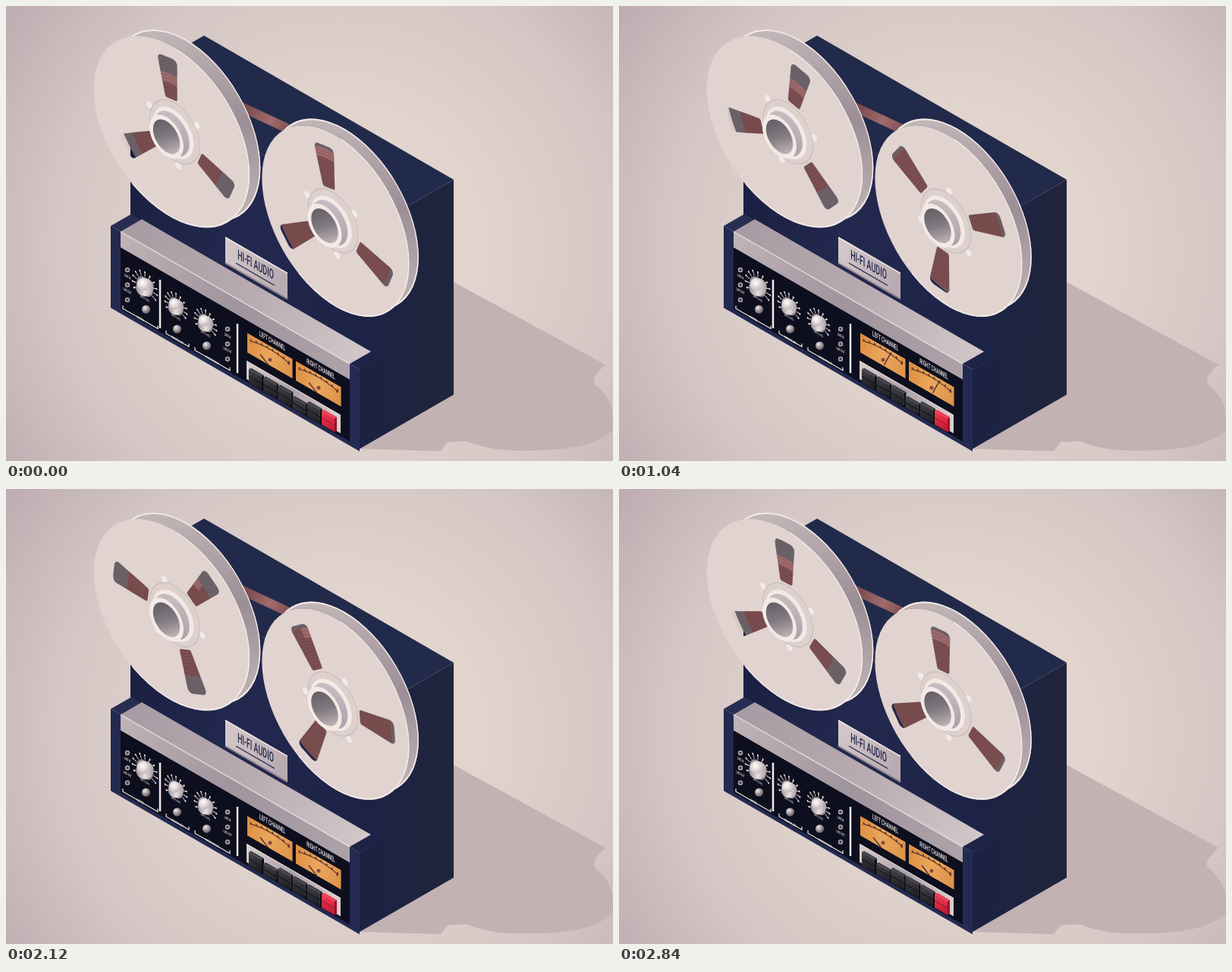
Recreate the animation shown at these times as an HTML page with a canvas. Size 800 by 600 pixels, loop 2880 ms.

```html
<!DOCTYPE html>
<html lang="en">
<head>
<meta charset="utf-8">
<title>Tape recorder</title>
<style>
  html, body { margin: 0; width: 100%; height: 100%; overflow: hidden; background: #dccfcb; }
  canvas { display: block; }
</style>
</head>
<body>
<canvas id="stage" width="800" height="600"></canvas>
<script>
const c = document.getElementById('stage').getContext('2d');
const LOOP = 2880, STEP = 40, REWIND_AT = 1920;
const SLOPE = Math.tan(Math.PI / 6), WIDTH = Math.cos(Math.PI / 6);
const RAD = Math.PI / 180;
const WHITE = '#f3eae6', NAVY = '#22264c';

function gradient(g, colors) {
  colors.forEach((color, i) => g.addColorStop(i / (colors.length - 1), color));
  return g;
}
const linear = (x1, y1, x2, y2, ...colors) => gradient(c.createLinearGradient(x1, y1, x2, y2), colors);
const radial = (x, y, r, ...colors) => gradient(c.createRadialGradient(x, y, 0, x, y, r), colors);

function line(color, width, ...points) {
  c.strokeStyle = color;
  c.lineWidth = width;
  c.beginPath();
  for (let i = 0; i < points.length; i += 2) c.lineTo(points[i], points[i + 1]);
  c.stroke();
}
function disc(fill, x, y, r) {
  c.fillStyle = fill;
  c.beginPath();
  c.arc(x, y, r, 0, 7);
  c.fill();
}
function ring(color, width, x, y, r, from = 0, to = 7) {
  c.strokeStyle = color;
  c.lineWidth = width;
  c.beginPath();
  c.arc(x, y, r, from, to);
  c.stroke();
}

// Isometric rectangles, each placed by its front left corner on screen.
function slab(fill, x, y, ax, ay, bx, by) {
  c.fillStyle = fill;
  c.beginPath();
  c.moveTo(x, y);
  c.lineTo(x + ax, y + ay);
  c.lineTo(x + ax + bx, y + ay + by);
  c.lineTo(x + bx, y + by);
  c.fill();
}
const front = (fill, x, y, w, h) => slab(fill, x, y, w, w * SLOPE, 0, h);
const top3d = (fill, x, y, w, d) => slab(fill, x, y, w, w * SLOPE, d, -d * SLOPE);
const side = (fill, x, y, d, h) => slab(fill, x, y, d, -d * SLOPE, 0, h);
const edge = (color, width, x, y, w) => line(color, width, x, y, x + w, y + w * SLOPE);
const across = (x, y, w, ...colors) => linear(x, y, x + w, y + w * SLOPE, ...colors);

// Draws in the front plane with its origin at (x, y).
function onFace(x, y, draw, width = WIDTH) {
  c.save();
  c.transform(width, .5, 0, 1, x, y);
  draw();
  c.restore();
}
function label(text, x, y, size, color = WHITE) {
  onFace(x, y, () => {
    c.scale(.59, 1);
    c.font = `500 ${size}px Roboto, sans-serif`;
    c.textAlign = 'center';
    c.textBaseline = 'middle';
    c.fillStyle = color;
    c.fillText(text, 0, 0);
  });
}

function drawBackground() {
  c.fillStyle = radial(440, 320, 570, '#e4d8cf', '#e1d4cd', '#d4c6c4', '#b9a8ae');
  c.fillRect(0, 0, 800, 600);
  c.fillStyle = '#c3b2b4';
  c.fill(new Path2D('M590 364 790 473Q769 492 777 500Q800 518 800 545V560Q770 587 690 586Q640 588 608 574L582 575 573 587 466 584Z'));
}

function drawCabinet() {
  top3d('#222a4b', 164, 95, 329, 97);
  side(linear(493, 0, 590, 0, '#1d2343', '#20253c'), 493, 285, 97, 228);
  front(across(164, 180, 329, '#191e3f', '#23284f', '#1d2346'), 164, 95, 329, 190);

  side(linear(466, 0, 590, 0, '#1c2243', '#20253c'), 466, 479, 124, 105);
  top3d(across(138, 290, 328, '#282d52', '#1d2346'), 138, 290, 328, 27);
  front(across(138, 290, 328, '#23294f', '#232b52'), 138, 290, 328, 108);

  top3d(across(151, 290, 330, '#a79ba3', '#b7abb0', '#d4cacb'), 151, 297.5, 302, 28);
  front(across(151, 300, 302, '#c0b4b8', '#a0949d', '#aea2a9'), 151, 297.5, 302, 21);
  edge('#e9dfdc', 1.4, 151, 297.5, 302);
  front('#0e0f1e', 151, 318.5, 302, 81.5);

  front(across(289, 305, 82, '#d6cac9', '#b8acb2'), 289, 305, 82, 34);
  edge(WHITE, 1.5, 289, 305, 82);
  edge('#8e838e', 2, 289, 339, 82);
  label('HI-FI AUDIO', 329, 342, 17.5, NAVY);
  edge(NAVY, 1.3, 303, 339, 51);
}

function drawSockets(x, y) {
  for (let i = 0; i < 3; i++) {
    disc('#b9adb0', x, y + i * 19.7, 3.2);
    disc('#4a4450', x, y + i * 19.7, 1.8);
  }
  label('LINE IN', x, y + 9, 5);
  label('LINE OUT', x, y + 28, 5);
}

function drawKnob(x, y, r) {
  onFace(x, y, () => {
    for (let degrees = 150; degrees <= 390; degrees += 24) {
      const co = Math.cos(degrees * RAD) * r, si = Math.sin(degrees * RAD) * r;
      line(WHITE, 1, co, si, co * 1.4, si * 1.4);
      disc(WHITE, co * 1.45, si * 1.45, 1.2);
    }
    disc('#8f858c', 0, 0, r * .95);
  });
  disc(linear(x - r, y, x + r, y, '#8e858b', '#e9e0df', '#9d9399'), x, y + 1, r * .9);
  disc(radial(x - 3, y - 5, r, '#ffffff', '#ddd3d3', '#b0a5aa'), x - 2, y - 3, r * .65);
  label('INPUT LEVEL', x, y + r + 3, 4);
  disc(radial(x, y + 28, 8, WHITE, '#a59ba0', '#655c66'), x + 1.5, y + 30, 5.5);
}

function drawBracket(x, y, w, text) {
  const endY = y + w * SLOPE;
  line(WHITE, 1.2, x, y - 4, x, y, x + w, endY, x + w, endY - 4);
  label(text, x + w / 2, (y + endY) / 2, 4.5);
}

function drawControls() {
  drawSockets(160, 348);
  drawSockets(292, 426);
  drawKnob(183, 370, 13);
  drawKnob(224, 396, 11.5);
  drawKnob(263, 418, 11.5);
  line(WHITE, 2.5, 203, 361, 203, 425);
  line(WHITE, 2.5, 305, 419, 305, 484);
  drawBracket(154, 399, 46, 'MASTER');
  drawBracket(211, 432, 30, 'MONITOR LEFT');
  drawBracket(249, 454, 46, 'MONITOR RIGHT');
}

function drawMeter(x, y, name, angle) {
  const ink = '#4b2c2a';
  label(name, x + 33, y + 11, 9.5);
  onFace(x, y, () => {
    c.beginPath();
    c.rect(0, 0, 69, 26);
    c.clip();
    c.fillStyle = linear(0, 0, 69, 20, '#dc8c3f', '#eba75c', '#dc9148');
    c.fill();
    const arcY = u => 4.5 + ((u - 34.5) / 15) ** 2;
    for (let u = 4; u < 64; u += 2) line(ink, 1.3, u, arcY(u), u + 2, arcY(u + 2));
    for (let u = 5; u < 64; u += 8.3) line(ink, 1.8, u, arcY(u) - 2.5, u + 1, arcY(u));
    disc('#70333c', 63, 9, 1.6);
  });
  // The needle turns about a point hidden below the window.
  c.save();
  c.beginPath();
  c.rect(x, y, 60, 59);
  c.clip();
  disc('#814a4b', x + 30, y + 35.5, 2.5);
  c.translate(x + 30, y + 45);
  c.rotate(angle);
  line('#4a3136', 1.4, 0, -3, 0, -21);
  c.restore();
}

function drawKey(x, y, pressed, [light, body, dark]) {
  const drop = pressed * 4, h = 18 - drop;
  y += drop;
  front(linear(x, y, x, y + 28, light, body), x, y, 17, h);
  top3d(light, x, y, 17, 3);
  side(dark, x + 17, y + 17 * SLOPE, 3, h);
  edge(dark, 1, x, y + h / 2, 17);
}

function drawKeys(play, rewind) {
  front(across(317, 468, 124, '#d9cecd', '#aca1a8', '#d9cecd'), 317, 468, 124, 24);
  edge(WHITE, 1, 317, 468, 124);
  const black = ['#424148', '#1a1a20', '#0c0c12'], red = ['#f03c52', '#bd1732', '#9f1029'];
  for (let i = 0; i < 6; i++)
    drawKey(320 + i * 19.2, 479 + i * 11, i === 3 ? play : i === 1 ? rewind : 0, i < 5 ? black : red);
}

function drawTape() {
  const colour = across(290, 120, 85, '#774a4d', '#7b4d4f', '#a06c6d', '#7b4b4e');
  slab(colour, 286, 115, 90, 42, 3, 15);
}

// One opening of the reel plate, pointing up.
const slot = new Path2D();
slot.moveTo(0, -94);
slot.arcTo(15.5, -94, 9, -41, 6);
slot.arcTo(9, -41, -9, -41, 2.5);
slot.arcTo(-9, -41, -15.5, -94, 2.5);
slot.arcTo(-15.5, -94, 0, -94, 6);
slot.closePath();

function drawReel({ x, y, plateShift, plateWidth, pack }, degrees) {
  const radius = 113;
  const at = (distance, draw) => onFace(x + distance, y - distance * SLOPE, draw);
  const openings = new Path2D();
  for (let i = 0; i < 3; i++)
    openings.addPath(slot, new DOMMatrix([WIDTH, .5, 0, 1, x, y]).rotate(degrees + i * 120));
  const circle = new Path2D();
  circle.arc(0, 0, radius, 0, 7);
  const plate = new Path2D();
  plate.addPath(circle, new DOMMatrix([plateWidth, .5, 0, 1, x + plateShift, y]));

  // Rear flange where it shows beside the front plate.
  c.save();
  const outside = new Path2D(plate);
  outside.rect(0, 0, 800, 600);
  c.clip(outside, 'evenodd');
  at(15, () => {
    disc(linear(-40, -110, 80, 90, '#c3b7b9', '#9b8e96', '#c2b5b7'), 0, 0, radius);
    ring(WHITE, 1.8, 0, 0, radius - .9);
  });
  c.restore();

  // Rear flange and wound tape seen through the openings.
  c.save();
  c.clip(openings);
  at(16, () => disc('#6a6166', 0, 0, radius));
  at(0, () => {
    disc('#7c4f50', 0, 0, pack);
    ring('#9f6b6c', 12, 0, 0, pack - 6, -2.15, -.95);
    for (let r = 34; r < pack; r += 4) ring('rgba(80,40,44,.35)', .8, 0, 0, r);
  });
  c.restore();

  const face = new Path2D(plate);
  face.addPath(openings);
  c.fillStyle = '#e0d3d0';
  c.fill(face, 'evenodd');
  onFace(x + plateShift, y, () => ring(WHITE, 1.8, 0, 0, radius - .9, -1.5, 2.1), plateWidth);

  at(0, () => {
    for (let i = 0; i < 3; i++) {
      const a = (degrees - 30 + i * 120) * RAD;
      disc(WHITE, 42 * Math.cos(a), 42 * Math.sin(a), 4.4);
    }
    disc('#ded1cd', 0, 0, 38);
    ring('#c3b6b5', .9, 0, 0, 38);
  });
  at(-2, () => disc(WHITE, 0, 0, 31));
  at(-4, () => disc(linear(0, -30, 20, 30, '#c9bdc2', '#a99ca7'), 0, 0, 27));
  at(-11, () => {
    disc(WHITE, 0, 0, 26);
    disc(linear(-14, -16, 12, 18, '#635e65', '#817a80', '#c2b7b9'), 0, 0, 20.5);
  });
}

const leftReel = { x: 222.5, y: 166, plateShift: -4, plateWidth: .91, pack: 73 };
const rightReel = { x: 431, y: 283.5, plateShift: 3.5, plateWidth: .86, pack: 90 };

// Wound amount: steady while playing, fast then slowing while rewinding.
function wound(t) {
  if (t < REWIND_AT) return t / REWIND_AT;
  const left = (LOOP - t) / (LOOP - REWIND_AT);
  return .2 * left + .8 * left ** 2.6;
}
function ease(t, from, to) {
  const p = Math.min(1, Math.max(0, (t - from) / (to - from)));
  return p * p * (3 - 2 * p);
}

function draw(t) {
  const turn = wound(t), switched = ease(t, 1800, 1960);
  const needle = (-38 + 67 * ease(t, 0, 500) - 29 * ease(t, 1040, 1400) - 38 * ease(t, 1840, 2120)) * RAD;
  drawBackground();
  drawCabinet();
  drawControls();
  drawMeter(318, 431, 'LEFT CHANNEL', needle);
  drawMeter(382, 468, 'RIGHT CHANNEL', needle);
  drawKeys(1 - switched, switched);
  drawTape();
  drawReel(leftReel, -7.3 + 480 * turn);
  drawReel(rightReel, -8.7 + 360 * turn);
}

const start = performance.now();
function tick() {
  const t = (performance.now() - start) % LOOP;
  draw(Math.floor(t / STEP) * STEP);
  requestAnimationFrame(tick);
}
tick();
</script>
</body>
</html>
```
